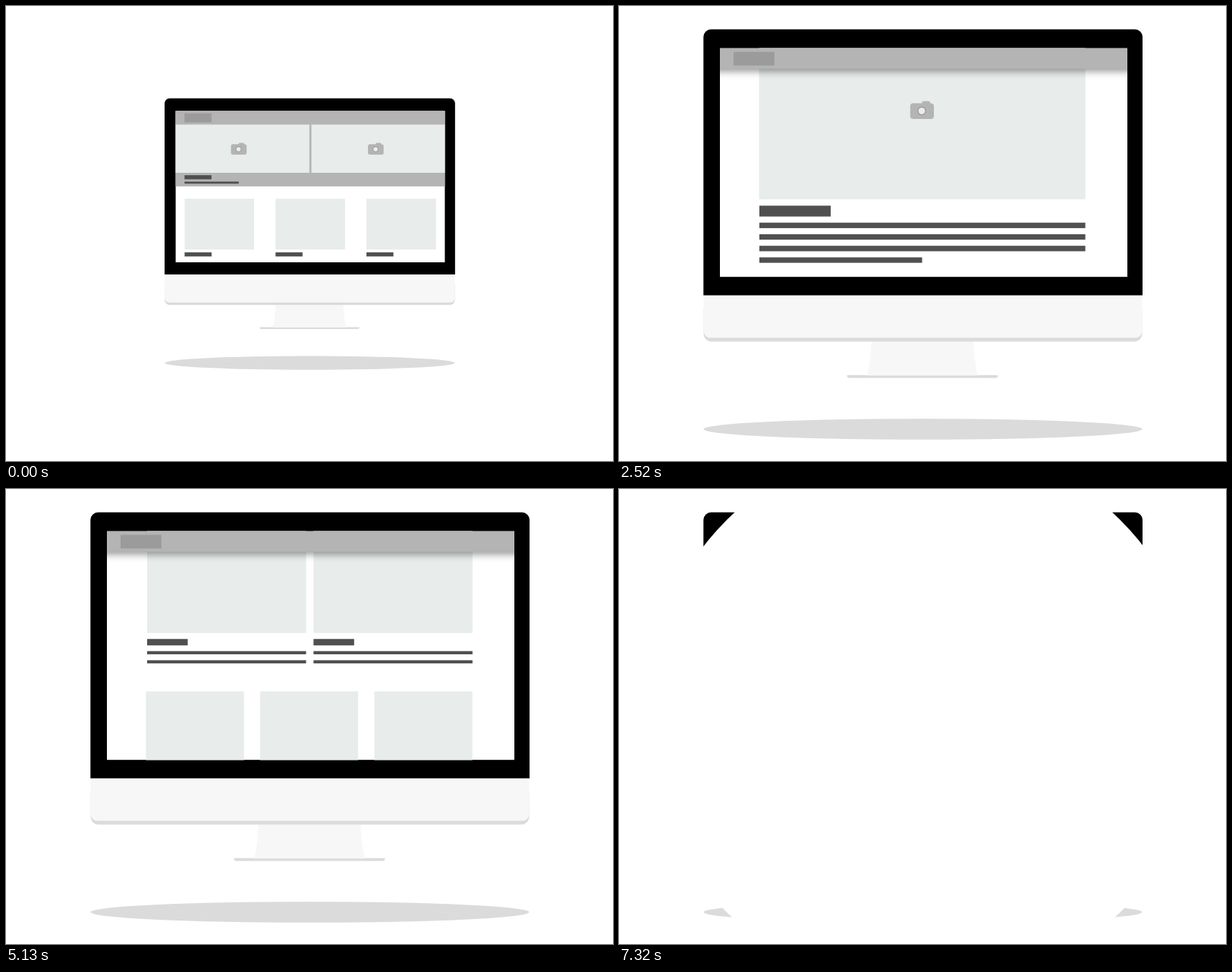
An HTML page with a canvas that plays this animation: 800x600 px, repeating every 7.35 s.

```html
<!DOCTYPE html>
<html lang="en">
<head>
<meta charset="utf-8">
<title>Page scrolling on a desktop screen</title>
<style>
  html, body { margin: 0; width: 100%; height: 100%; overflow: hidden; background: #fff; }
  canvas { display: block; width: 800px; height: 600px; }
</style>
</head>
<body>
<canvas id="stage" width="800" height="600"></canvas>
<script>
const ctx = document.getElementById('stage').getContext('2d');
const STEP = 30, LOOP = 7350;
const MAX_SCROLL = 1007.5;
const GREY = '#b4b4b4', LOGO = '#9b9b9b', TILE = '#e8eceb', INK = '#505050';
const SHELL = '#f7f7f7', RIM = '#dbdbdb';
const SCREEN = { left: 133, top: 55.4, right: 670, bottom: 357.4 };

const clamp = v => Math.max(0, Math.min(1, v));
const progress = (t, from, to) => clamp((t - from) / (to - from));

function box(color, left, top, right, bottom) {
  ctx.fillStyle = color;
  ctx.fillRect(left, top, right - left, bottom - top);
}

function round(color, left, top, right, bottom, radii) {
  ctx.fillStyle = color;
  ctx.beginPath();
  ctx.roundRect(left, top, right - left, bottom - top, radii);
  ctx.fill();
}

function ellipse(color, x, y, rx, ry = rx) {
  ctx.fillStyle = color;
  ctx.beginPath();
  ctx.ellipse(x, y, rx, ry, 0, 0, Math.PI * 2);
  ctx.fill();
}

function camera(x, y) {
  round(GREY, x + 0.5, y - 12.7, x + 11, y - 6, 1.5);
  round(GREY, x - 15.2, y - 10, x + 16, y + 10.8, 4);
  ellipse(LOGO, x, y, 5.8);
  ellipse(TILE, x, y, 4.4);
}

function monitor() {
  ellipse(RIM, 400.5, 558, 289, 13.8);

  ctx.fillStyle = SHELL;
  ctx.beginPath();
  ctx.moveTo(333, 440);
  ctx.quadraticCurveTo(331, 474, 327, 487);
  ctx.lineTo(473, 487);
  ctx.quadraticCurveTo(469, 474, 467, 440);
  ctx.fill();
  round(RIM, 300.5, 486.8, 499.5, 490.6, [1, 1, 4, 4]);
  box(SHELL, 327, 485, 473, 487.3);

  round(RIM, 111.5, 400, 689.5, 442.4, [0, 0, 10, 10]);
  round(SHELL, 111.5, 381, 689.5, 437.6, [0, 0, 9, 9]);
  round('#000', 111.3, 30.7, 690, 381.5, [10, 10, 0, 0]);
}

function thumbnails(top, lefts, width, labelGap) {
  for (const x of lefts) {
    box(TILE, x, top, x + width, top + 101.3);
    box(INK, x, top + 101.3 + labelGap, x + 53.7, top + 109.6 + labelGap);
  }
}

function cards(top) {
  for (const x of [186, 405.3]) {
    const end = x + 209.5;
    box(TILE, x, top, end, top + 167.1);
    box(INK, x, top + 175, x + 53.5, top + 183.5);
    box(INK, x, top + 191, end, top + 195.2);
    box(INK, x, top + 203, end, top + 207.2);
  }
}

function page() {
  const { left, right } = SCREEN;
  box(GREY, left, 82.5, right, 206.1);
  box(TILE, left, 82.5, 399.8, 179);
  box(TILE, 403.8, 82.5, right, 179);
  camera(258.7, 132);
  camera(531.7, 132);
  box(INK, 151, 183.8, 204.8, 192);
  box(INK, 151, 196.5, 259, 200.7);
  thumbnails(230.7, [151.2, 332.4, 513.5], 138.4, 5.5);

  box(TILE, 184.6, 382.2, 614.6, 617.7);
  camera(399, 501);
  box(INK, 185, 626, 279, 640.3);
  for (let i = 0; i < 4; i++) {
    const y = 648.4 + i * 15.25;
    box(INK, 185, y, i < 3 ? 614.6 : 399.5, y + 7.2);
  }

  cards(738.2);
  cards(969.8);
  thumbnails(1214, [184.5, 335, 485.5], 129.1, 8);
}

function header(shadow) {
  const { left, top, right } = SCREEN;
  ctx.save();
  ctx.shadowColor = `rgba(0,0,0,${0.38 * shadow})`;
  ctx.shadowBlur = 10;
  ctx.shadowOffsetY = 4;
  box(GREY, left - 20, top, right + 20, 82.8);
  ctx.restore();
  box(LOGO, 151, 60.5, 204.8, 78.5);
}

function draw(t) {
  const zoom = 0.6615 + 0.3385 * progress(t, 0, 450);
  const scroll = MAX_SCROLL * (progress(t, 900, 5400) - progress(t, 6300, 7200));
  const wipe = 407 * progress(t, 7050, 7350);

  box('#fff', 0, 0, 800, 600);
  ctx.save();
  ctx.translate(400, 300);
  ctx.scale(zoom, zoom);
  ctx.translate(-400, -300);
  monitor();

  ctx.beginPath();
  ctx.rect(SCREEN.left, SCREEN.top, SCREEN.right - SCREEN.left, SCREEN.bottom - SCREEN.top);
  ctx.clip();
  box('#fff', SCREEN.left, SCREEN.top, SCREEN.right, SCREEN.bottom);
  ctx.save();
  ctx.translate(0, -scroll);
  page();
  ctx.restore();
  header(clamp(scroll / 100));
  ctx.restore();

  if (wipe > 0) ellipse('#fff', 401.3, 299.5, wipe);
}

const start = performance.now();
function tick() {
  const t = (performance.now() - start) % LOOP;
  draw(Math.floor(t / STEP) * STEP);
  requestAnimationFrame(tick);
}
tick();
</script>
</body>
</html>
```
